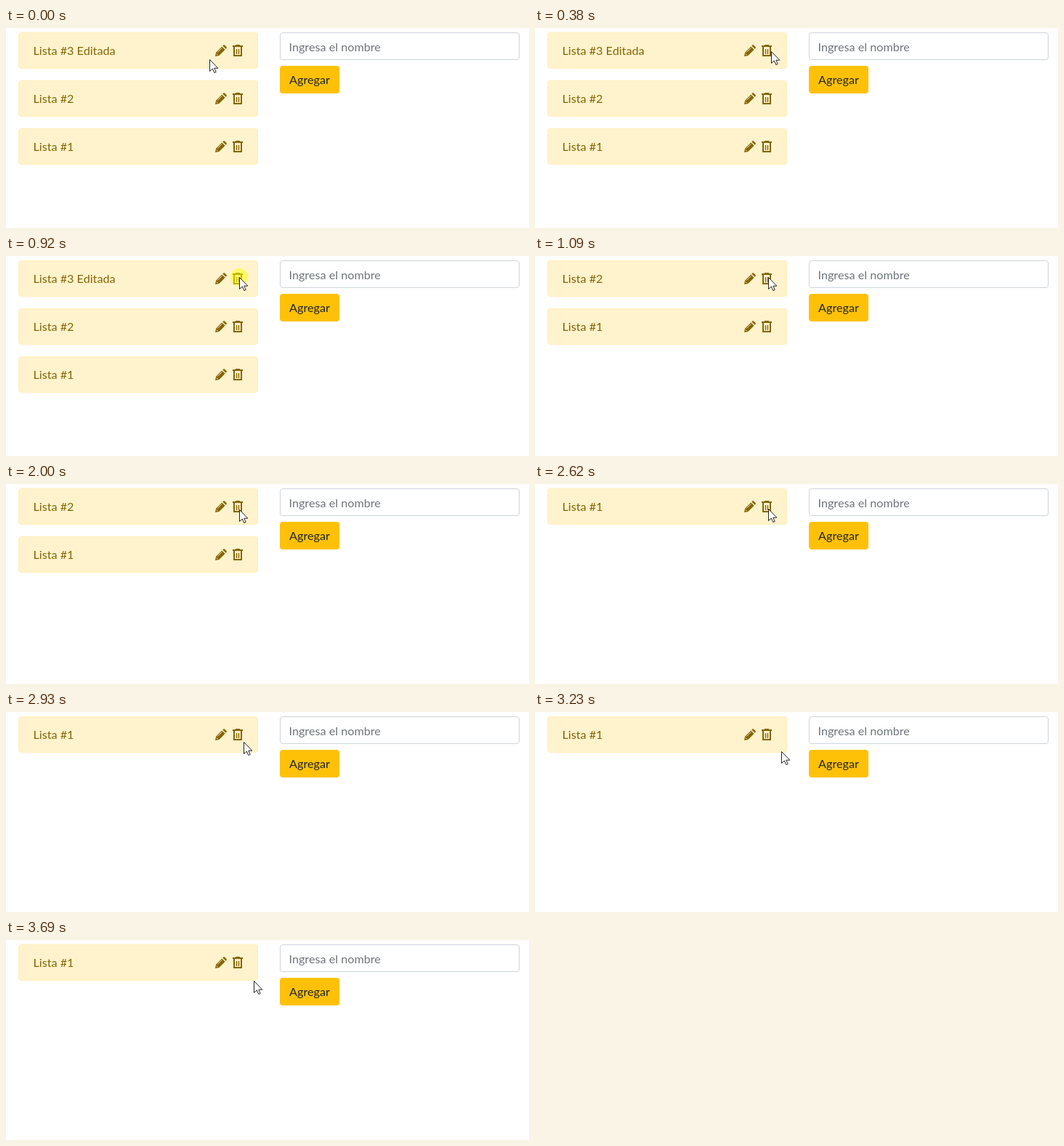
Write an HTML page that moves like this. It is 720x275 px and loops after 3.94 s.

```html
<!DOCTYPE html>
<html lang="es">
<head>
<meta charset="utf-8">
<style>
  html, body { margin: 0; width: 100%; height: 100%; overflow: hidden; background: #fff; }
  svg { display: block; font: 16.2px Lato, sans-serif; }
  .card { fill: #856404; }
  .card rect { fill: #fff3cd; stroke: #ffeeba; }
</style>
</head>
<body>
<svg width="720" height="275" viewBox="0 0 720 275">
  <defs>
    <g id="pencil">
      <path d="M0 16 1 10.7 9.3 2.4 13.6 6.7 5.3 15zM10.3 1.4 11.3.4Q12.1-.3 12.9.4L15.6 3.1Q16.3 3.9 15.6 4.7L14.6 5.7z"/>
      <path d="M3.2 10.6 9.4 4.4M1.8 12.4 3.6 14.2" fill="none" stroke="#fff3cd" stroke-width=".9"/>
    </g>
    <g id="trash">
      <path d="M0 1H4V0H10V1H14V3H0z"/>
      <path d="M2 3V15H12V3" fill="none" stroke="#856404" stroke-width="2"/>
      <path d="M5.5 6V13M8.5 6V13" stroke="#856404" stroke-width="1.4"/>
    </g>
  </defs>
  <g id="list"></g>
  <rect x="377.5" y="6.5" width="329" height="37" rx="3.5" fill="#fff" stroke="#ced4da"/>
  <text x="389.5" y="32" fill="#6c757d">Ingresa el nombre</text>
  <rect x="377" y="52" width="82" height="38" rx="4" fill="#ffc107"/>
  <text x="390" y="77" fill="#212529">Agregar</text>
  <circle id="click" r="12" fill="#ff0" fill-opacity=".5"/>
  <path id="cursor" d="M.5.5V16.5L4.3 13 6.8 18.5 9.2 17.5 6.8 12.2H11.8z" fill="#fff" stroke="#222"/>
</svg>
<script>
const LOOP = 3940, TICK = 1000 / 13;
const labels = ["Lista #3 Editada", "Lista #2", "Lista #1"];
const home = [280, 43];
// Pointer glides, times in ticks
const glides = [
  { from: 0, to: 5, x: 325, y: 32 },
  { from: 6, to: 9, x: 321, y: 29 },
  { from: 25, to: 27, x: 321, y: 41 },
  { from: 29, to: 31, x: 321, y: 34 },
  { from: 35, to: 43, x: 340, y: 55 },
  { from: 47, to: 48, x: 341, y: 56 }
];
const clicks = [[920, 1090], [2540, 2620]];
const [list, click, cursor] = ["list", "click", "cursor"].map(id => document.getElementById(id));

const card = (label, i) => `<g class="card" transform="translate(17 ${6 + 66 * i})">
  <rect x=".5" y=".5" width="329" height="49" rx="3.5"/>
  <text x="20.5" y="31">${label}</text>
  <use href="#pencil" x="271" y="17"/><use href="#trash" x="295" y="17"/></g>`;

function smooth(p) {
  p = Math.min(1, Math.max(0, p));
  return p * p * (3 - 2 * p);
}

// The pointer is sampled 13 times a second
function pointerAt(t) {
  const tick = Math.floor((t + 10) / TICK);
  let [x, y] = home;
  for (const g of glides) {
    const p = smooth((tick - g.from) / (g.to - g.from));
    x += (g.x - x) * p;
    y += (g.y - y) * p;
  }
  return `translate(${Math.round(x)} ${Math.round(y)})`;
}

let shown = -1;
function draw(t) {
  const removed = clicks.filter(([, end]) => t >= end).length;
  if (removed !== shown) {
    shown = removed;
    list.innerHTML = labels.slice(removed).map(card).join("");
  }
  const place = pointerAt(t);
  cursor.setAttribute("transform", place);
  click.setAttribute("transform", place);
  const pressed = clicks.some(([start, end]) => t >= start && t < end);
  click.setAttribute("visibility", pressed ? "visible" : "hidden");
}

const origin = performance.now();
function loop() {
  draw((performance.now() - origin) % LOOP);
  requestAnimationFrame(loop);
}
loop();
</script>
</body>
</html>
```
